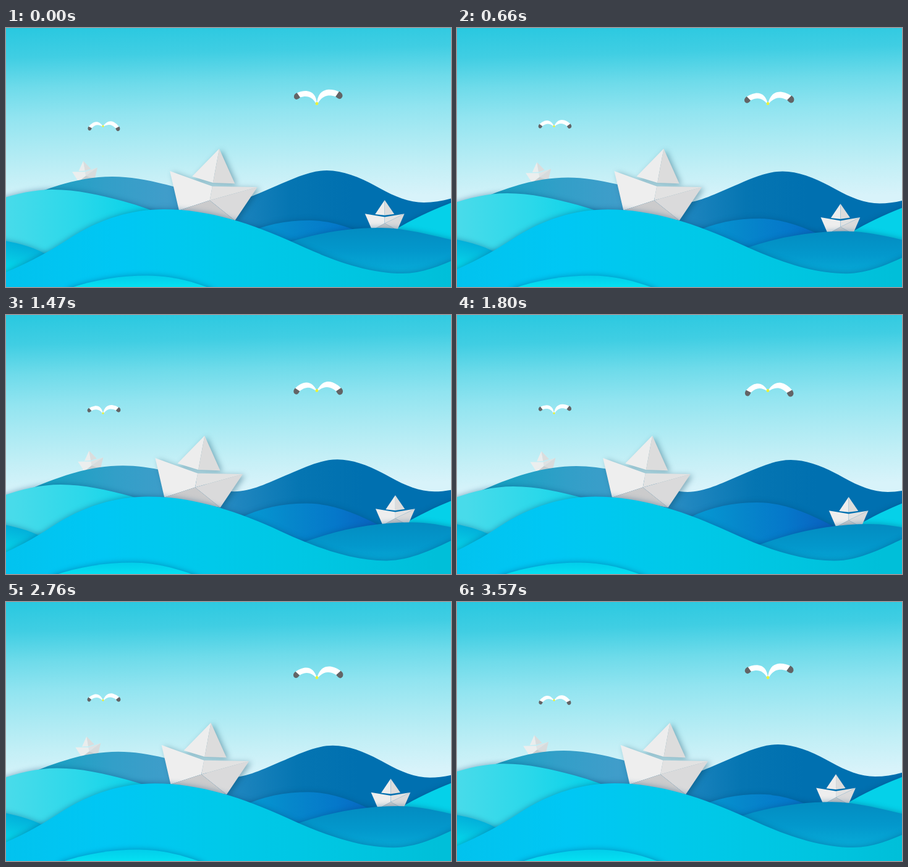
Write an HTML page that moves like this. It is 720 px wide and 420 px high and loops after 3600 ms.

```html
<!DOCTYPE html>
<html lang="en">
<head>
<meta charset="utf-8">
<title>Paper boats</title>
<style>
  html, body { margin: 0; width: 100%; height: 100%; overflow: hidden; background: #2bcae1; }
  svg { display: block; width: 100vw; height: 100vh; }
  .wave { filter: drop-shadow(0 -1px 4px rgba(0, 70, 120, .38)); }
  .lifted { filter: drop-shadow(4px 2px 5px rgba(0, 60, 90, .38)); }
</style>
</head>
<body>
<svg id="stage" viewBox="0 0 720 420" preserveAspectRatio="none"></svg>
<script>
const NS = 'http://www.w3.org/2000/svg';
const LOOP = 3600;
const stage = document.getElementById('stage');
const movers = [];

function add(parent, tag, attrs = {}) {
  const el = document.createElementNS(NS, tag);
  for (const key in attrs) el.setAttribute(key, attrs[key]);
  parent.appendChild(el);
  return el;
}

const defs = add(stage, 'defs');

// Evenly spaced colours along the line x1,y1 to x2,y2.
function gradient(id, [x1, y1, x2, y2], ...colors) {
  const g = add(defs, 'linearGradient', { id, x1, y1, x2, y2, gradientUnits: 'userSpaceOnUse' });
  colors.forEach((color, i) => add(g, 'stop', { offset: i / (colors.length - 1), 'stop-color': color }));
  return `url(#${id})`;
}

// Cubic curve through [x, y, slope] keys, closed far below the stage.
function crest(keys) {
  let d = `M${keys[0][0]} ${keys[0][1]}`;
  for (let i = 1; i < keys.length; i++) {
    const [x1, y1, s1 = 0] = keys[i - 1];
    const [x2, y2, s2 = 0] = keys[i];
    const h = (x2 - x1) / 3;
    d += `C${x1 + h} ${y1 + s1 * h} ${x2 - h} ${y2 - s2 * h} ${x2} ${y2}`;
  }
  return `${d}V520H${keys[0][0]}Z`;
}

function drift(el, dx, dy) {
  movers.push(p => el.setAttribute('transform', `translate(${dx * p} ${dy * p})`));
}

function wave(keys, fill, dx, dy, style = 'wave') {
  const g = add(stage, 'g', { class: style });
  drift(add(g, 'path', { d: crest(keys), fill }), dx, dy);
}

function boat(x, y, scale, angle, dx, dy, attrs = {}) {
  const mover = add(add(stage, 'g', attrs), 'g');
  const hull = add(mover, 'g', { transform: `translate(${x} ${y}) rotate(${angle}) scale(${scale})` });
  const facet = (points, fill) => add(hull, 'polygon', { points, fill });
  facet('0,-50 -35,2 0,6', '#ededed');
  facet('0,-50 35,1 0,6', '#dcdcdc');
  facet('-72,0 0,12 0,35 -46,60', '#eeeeee');
  facet('0,12 72,0 0,35', '#e2e2e2');
  facet('72,0 46,60 0,35', '#dadadb');
  facet('0,35 46,60 -46,60', '#cbcbcc');
  drift(mover, dx, dy);
}

// Wings turn around the body and look a little shorter when lowered.
function bird(x, y, scale, from, to) {
  const g = add(stage, 'g', { transform: `translate(${x} ${y}) scale(${scale})` });
  const wings = [-.95, 1.06].map(size => {
    const side = add(g, 'g', { transform: `scale(${size} ${Math.abs(size)})` });
    const wing = add(side, 'g');
    add(wing, 'path', { fill: '#fff', d: 'M0 0C1 -13 6 -21 18 -22Q28 -22 35 -18L29 -11C16 -15 8 -12 1 0Z' });
    add(wing, 'path', { fill: '#636466', d: 'M34 -19Q40 -16 39 -11Q36 -4 28.500 -11Z' });
    return wing;
  });
  add(g, 'ellipse', { cy: -.5, rx: 2.3, ry: 2.6, fill: '#e9f23c' });
  movers.push(p => {
    const angle = from + (to - from) * p;
    const pose = `rotate(${angle}) scale(${1 - angle / 550})`;
    for (const wing of wings) wing.setAttribute('transform', pose);
  });
}

add(stage, 'rect', {
  width: 720, height: 420,
  fill: gradient('sky', [0, 0, 8, 290],
    '#29c8e0', '#40cee3', '#6edbea', '#91e4f0', '#abeaf3', '#c3eff6', '#d8f3fa')
});

bird(503, 123, 1, 0, 27);
bird(157, 159.5, .67, 30, 3);

boat(127.5, 229.8, .289, -9.7, 11.5, 5.3, { opacity: .94 });

wave([[20, 280, -.45], [172, 241], [265, 255.5, .26], [352, 283], [435, 257, -.42],
  [519, 231], [605, 260, .56], [676, 283], [780, 255, -.4]],
  gradient('far', [60, 0, 560, 0], '#1aa1c3', '#329fc8', '#409dca', '#1f86bf', '#0575b2', '#0070b0'),
  21, 4, 'flat');

wave([[-20, 281, -.35], [76, 262], [190, 281, .27], [450, 360], [640, 321, -.57], [725, 281.5, -.38]],
  gradient('cyan', [0, 0, 230, 0], '#48dbea', '#2bd8ea', '#05d1e9'), 15, 16);

wave([[380, 337, -.5], [491, 312], [600, 343.5, .5], [680, 385, .5]],
  gradient('mid', [390, 0, 610, 0], '#0599d3', '#0687cb', '#0578ca', '#0a60bf'), -5, -8);

boat(612.7, 301.2, .443, 0, 21, 16);

wave([[380, 375, -.4], [465, 345, -.3], [605, 324], [730, 345.5, .22]],
  gradient('right', [0, 324, 0, 400], '#038cc1', '#0398cc', '#08add9'), 62, 15);

wave([[-20, 341.5, .2], [65, 367, .55], [200, 440, .5]],
  gradient('left', [0, 345, -12, 395], '#02b0da', '#05c6e3', '#02e0ef'), -5, -7);

boat(336, 245, 1, 10.4, -29, 0, { class: 'lifted' });

wave([[-40, 412, -.38], [100, 343, -.66], [256, 294], [470, 350, .46], [642, 398], [800, 341, -.4]],
  gradient('front', [0, 0, 720, 0], '#02c2ee', '#00c7f4', '#00c9ea', '#00c6e2', '#00bfd9'), -32, .5);

wave([[100, 423, -.35], [228, 401.5], [335, 424, .4]],
  gradient('low', [0, 401, 0, 424], '#02cdea', '#05e4f3'), -30, 0);

// Everything swings at constant speed: out in the first half, back in the second.
function draw(now) {
  const p = 1 - Math.abs(1 - 2 * (now % LOOP) / LOOP);
  for (const move of movers) move(p);
}

const start = performance.now();
function tick() {
  draw(performance.now() - start);
  requestAnimationFrame(tick);
}
tick();
</script>
</body>
</html>
```
